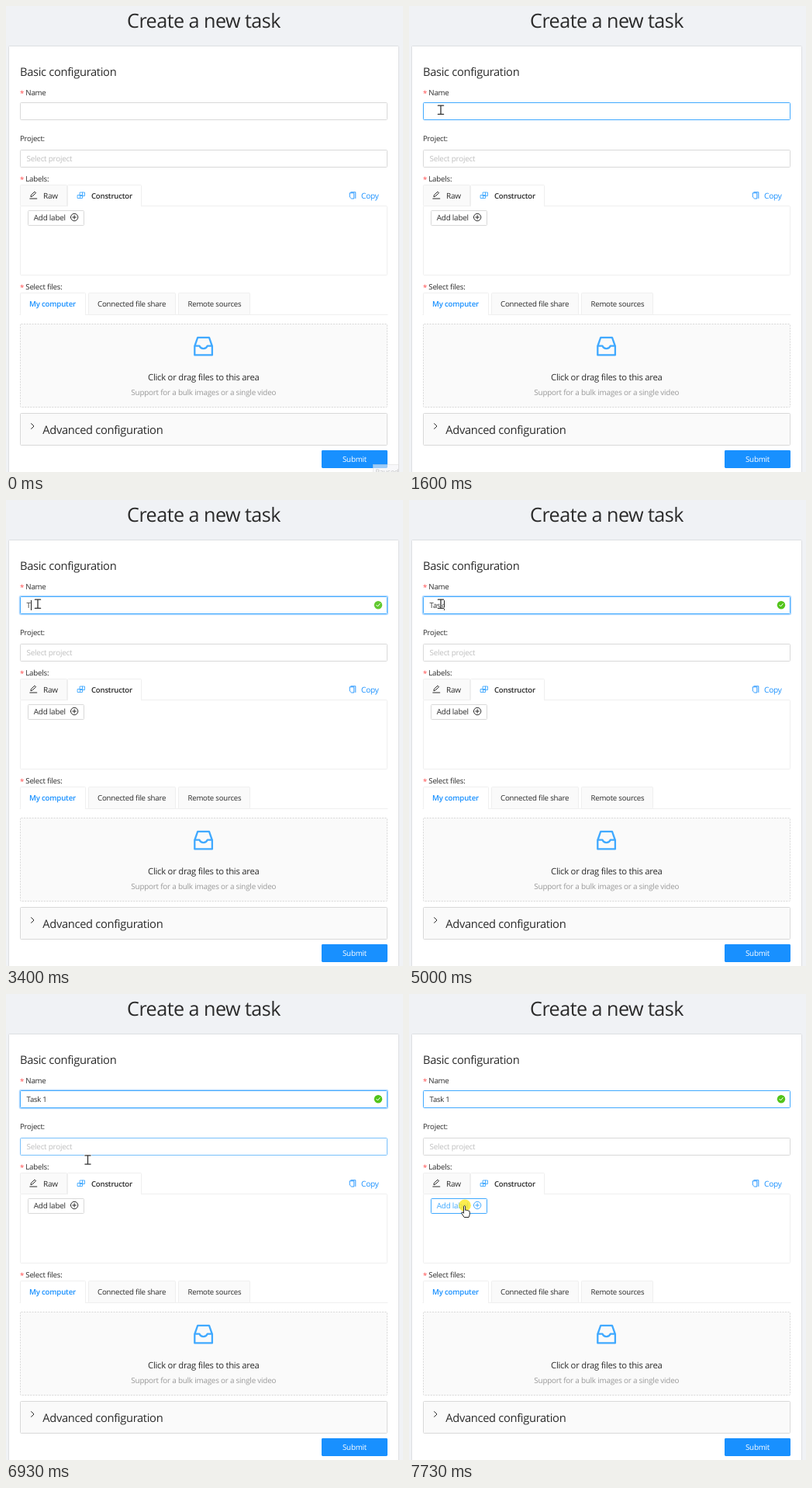
These frames come from a looping animation (512 by 600 pixels, 8000 ms). An HTML page:

```html
<!DOCTYPE html>
<html lang="en">
<head>
<meta charset="utf-8">
<title>Create a new task</title>
<style>
  html, body { margin: 0; width: 100%; height: 100%; overflow: hidden; background: #f0f2f5; }
  svg { display: block; width: 100vw; height: 100vh; }
  text {
    font: 9.7px "Open Sans", "Noto Sans", sans-serif;
    letter-spacing: -.022em;
    fill: #2b2b2b;
    white-space: pre;
    text-rendering: geometricPrecision;
  }
  .line { fill: none; stroke-linecap: round; stroke-linejoin: round; }
</style>
</head>
<body>
<svg id="stage" viewBox="0 0 512 600" xmlns="http://www.w3.org/2000/svg"></svg>
<script>
const stage = document.getElementById("stage");
const BLUE = "#1890ff", HOVER = "#40a9ff", GREY = "#d9d9d9", PALE = "#efefef", INK = "#2b2b2b";
const LOOP = 8000;

function add(tag, attrs, parent = stage) {
  const node = document.createElementNS("http://www.w3.org/2000/svg", tag);
  for (const key in attrs) node.setAttribute(key, attrs[key]);
  return parent.appendChild(node);
}
function set(node, attrs) {
  for (const key in attrs) node.setAttribute(key, attrs[key]);
}
function label(x, y, content, { size = 9.7, fill = INK, weight = 400, anchor = "start" } = {}) {
  const node = add("text", { x, y, "text-anchor": anchor });
  Object.assign(node.style, { fontSize: size + "px", fill, fontWeight: weight });
  node.textContent = content;
  return node;
}
// Box given by its outer edges, with a one-pixel border inside
function box(x1, y1, x2, y2, stroke = GREY, fill = "#fff", rx = 1) {
  return add("rect", { x: x1 + .5, y: y1 + .5, width: x2 - x1 - 1, height: y2 - y1 - 1, rx, fill, stroke });
}
function line(d, stroke, width = 1, parent = stage) {
  return add("path", { d, stroke, "stroke-width": width, class: "line" }, parent);
}
function required(y, content) {
  label(18, y + 1, "*", { fill: "#ff4d4f" });
  label(25.3, y, content);
}

// Page and headings
add("rect", { width: 512, height: 600, fill: "#f0f2f5" });
label(255, 27.5, "Create a new task", { size: 25.2, anchor: "middle" });
box(3, 51, 507, 620, "#dddfe2");
label(18, 90.3, "Basic configuration", { size: 14.7 });

// Name and project
required(114.5, "Name");
const glow = add("rect", { x: 17.5, y: 123.5, width: 475, height: 24, rx: 2, fill: "none", stroke: BLUE, "stroke-width": 1.6 });
const nameBox = box(18, 124, 492, 147);
const nameText = label(26.6, 139, "", { size: 9.5 });
const caret = add("rect", { y: 129, width: 1, height: 13, fill: "#222" });
const valid = add("g", {});
add("circle", { cx: 480, cy: 135.2, r: 5.2, fill: "#52c41a" }, valid);
line("M477.8 135.3l1.6 1.7 2.8-3.4", "#fff", 1, valid);
label(18, 173.5, "Project:", { size: 9.6 });
const projectBox = box(18, 185, 492, 208);
label(26.5, 199.8, "Select project", { size: 9.9, fill: "#bfbfbf" });

// Label editor
required(225.7, "Labels:");
box(18, 257, 492, 347, PALE);
box(18, 230, 79, 258, PALE, "#fafafa");
box(79, 230, 175, 258, PALE);
add("rect", { x: 80, y: 256, width: 94, height: 3, fill: "#fff" });
line("M32 245.3l.4-2 4.6-4.2 1.6 1.6-4.6 4.2zM30.8 248h9", INK);
label(48, 247.6, "Raw", { size: 10 });
line("M92.5 243.5h6v4h-6zM95.5 240h6v4.5h-6zM95.5 243.5v4M98.5 240v4.5", HOVER, .9);
label(110, 247.6, "Constructor", { size: 9.6, weight: 600 });
line("M444.8 239.7h6v7.8M443.6 240.8h5.2v7.2h-3.2l-2-1.8z", BLUE, .9);
label(458, 247.6, "Copy", { size: 10.1, fill: BLUE });
const addBox = box(28, 263, 101, 283);
const addText = label(35.8, 276.4, "Add label", { size: 9.9 });
const addIcon = line("M83.4 272a4.7 4.7 0 1 0 9.4 0a4.7 4.7 0 1 0 -9.4 0M85.8 272h4.6M88.1 269.7v4.6", INK);

// File picker
required(365, "Select files:");
line("M18 397.5H492", PALE);
box(18, 369, 103, 398, PALE);
add("rect", { x: 19, y: 396, width: 83, height: 3, fill: "#fff" });
box(106, 369, 219, 398, PALE, "#fafafa");
box(222, 369, 315, 398, PALE, "#fafafa");
label(30, 387.3, "My computer", { fill: BLUE, weight: 600 });
label(118, 387.3, "Connected file share");
label(234.5, 387.3, "Remote sources", { size: 9.6 });
const dropBox = box(18, 409, 492, 517, GREY, "#fafafa");
set(dropBox, { "stroke-dasharray": "2.1 1.4" });
line("M243.3 449.4V438L247.2 426.8H262L265.9 438V449.4ZM243.3 437.6h6.2q1.5 3.6 5.1 3.6t5.1-3.6h6.2", HOVER, 2.3);
label(254.8, 482.2, "Click or drag files to this area", { size: 11.3, anchor: "middle" });
label(254.8, 500.7, "Support for a bulk images or a single video", { size: 9.9, fill: "#999", anchor: "middle" });

// Footer
box(18, 524, 492, 566, GREY, "#fafafa");
line("M32.6 537.6l3.4 3.4-3.4 3.4", INK);
label(47.3, 550.6, "Advanced configuration", { size: 14.7 });
add("rect", { x: 407, y: 572, width: 85, height: 23, rx: 1.4, fill: BLUE });
label(449.5, 587.3, "Submit", { size: 9.8, fill: "#fff", anchor: "middle" });
const toast = add("g", {});
add("rect", { x: 473.5, y: 590.5, width: 33, height: 14, fill: "#f4f5f7", stroke: "#ddd" }, toast);
toast.append(label(476.5, 603, "Paused", { size: 9, fill: "#999" }));

// Pointers
const spot = add("circle", { r: 7.8, fill: "#fbe822", "fill-opacity": .8 });
const pointers = { arrow: add("g", {}), beam: add("g", {}), hand: add("g", {}) };
const beamPath = "M-3.6-5.6h7.2M-3.6 5.6h7.2M0-5.6v11.2";
add("path", { d: "M0 0V11L2.6 8.8L4.3 12.4L6 11.6L4.5 8.2H7.8Z", fill: "#fff", stroke: "#111", "stroke-width": .9 }, pointers.arrow);
line(beamPath, "#fff", 2.6, pointers.beam);
line(beamPath, "#333", 1.3, pointers.beam);
add("path", {
  d: "M-1 1Q0-.6 1.2 1V6Q2.4 5 3.2 6.3Q4.5 5.4 5.2 6.8Q6.7 6.2 6.8 8V11.5L5.6 15H-.3L-3.6 10Q-3.8 8-2.4 8.4L-1 9.8Z",
  fill: "#fff", stroke: "#111", "stroke-width": .9, "stroke-linejoin": "round"
}, pointers.hand);

// Each step changes only the listed properties and holds until the next
const start = {
  toast: .6, pointer: null, drop: false, name: GREY, glow: 0, text: "", caret: false,
  valid: 0, project: false, button: false, spot: null
};
const steps = [
  [330, { toast: .42 }],
  [530, { toast: .25 }],
  [800, { toast: .12 }],
  [1130, { toast: 0, pointer: ["arrow", 377, 346], drop: true }],
  [1330, { pointer: ["beam", 62, 145.5], drop: false }],
  [1600, { pointer: ["beam", 41, 133.8], name: HOVER }],
  [1930, { glow: .15, spot: [41, 134] }],
  [2130, { glow: .3, caret: true, spot: null }],
  [2400, { caret: false }],
  [2930, { caret: true }],
  [3400, { text: "T", valid: .9 }],
  [3730, { valid: 1 }],
  [4000, { caret: false }],
  [4200, { text: "Ta", caret: true }],
  [4530, { text: "Tas" }],
  [5000, { text: "Task" }],
  [5600, { pointer: ["arrow", 103, 151] }],
  [5800, { text: "Task " }],
  [6130, { text: "Task 1", pointer: ["arrow", 105, 151] }],
  [6400, { caret: false, pointer: ["arrow", 105, 166] }],
  [6600, { pointer: ["beam", 106, 186] }],
  [6930, { pointer: ["beam", 105.5, 213.5], project: true }],
  [7200, { pointer: ["arrow", 78, 287], project: false, caret: true }],
  [7400, { pointer: ["hand", 71.5, 272.5], button: true }],
  [7730, { caret: false, glow: 0, spot: [72, 272.3] }]
];

function stateAt(time) {
  return Object.assign({}, start, ...steps.filter(([at]) => at <= time).map(([, change]) => change));
}

function render(time) {
  const s = stateAt(time);
  set(toast, { opacity: s.toast });
  set(dropBox, { stroke: s.drop ? HOVER : GREY });
  set(nameBox, { stroke: s.name });
  set(glow, { opacity: s.glow });
  set(projectBox, { stroke: s.project ? "#79c0fb" : GREY });
  set(valid, { opacity: s.valid });

  nameText.textContent = s.text;
  const width = s.text ? nameText.getComputedTextLength() : 0;
  set(caret, { x: Math.round(27 + width), opacity: +s.caret });

  const tint = s.button ? HOVER : INK;
  set(addBox, { stroke: s.button ? HOVER : GREY });
  set(addIcon, { stroke: tint });
  addText.style.fill = tint;

  const [kind, x, y] = s.pointer || [];
  for (const name in pointers) {
    set(pointers[name], name === kind
      ? { visibility: "visible", transform: `translate(${x} ${y})` }
      : { visibility: "hidden" });
  }
  set(spot, s.spot ? { cx: s.spot[0], cy: s.spot[1], opacity: 1 } : { opacity: 0 });
}

const begin = performance.now();
function tick() {
  render((performance.now() - begin) % LOOP);
  requestAnimationFrame(tick);
}
tick();
</script>
</body>
</html>
```
